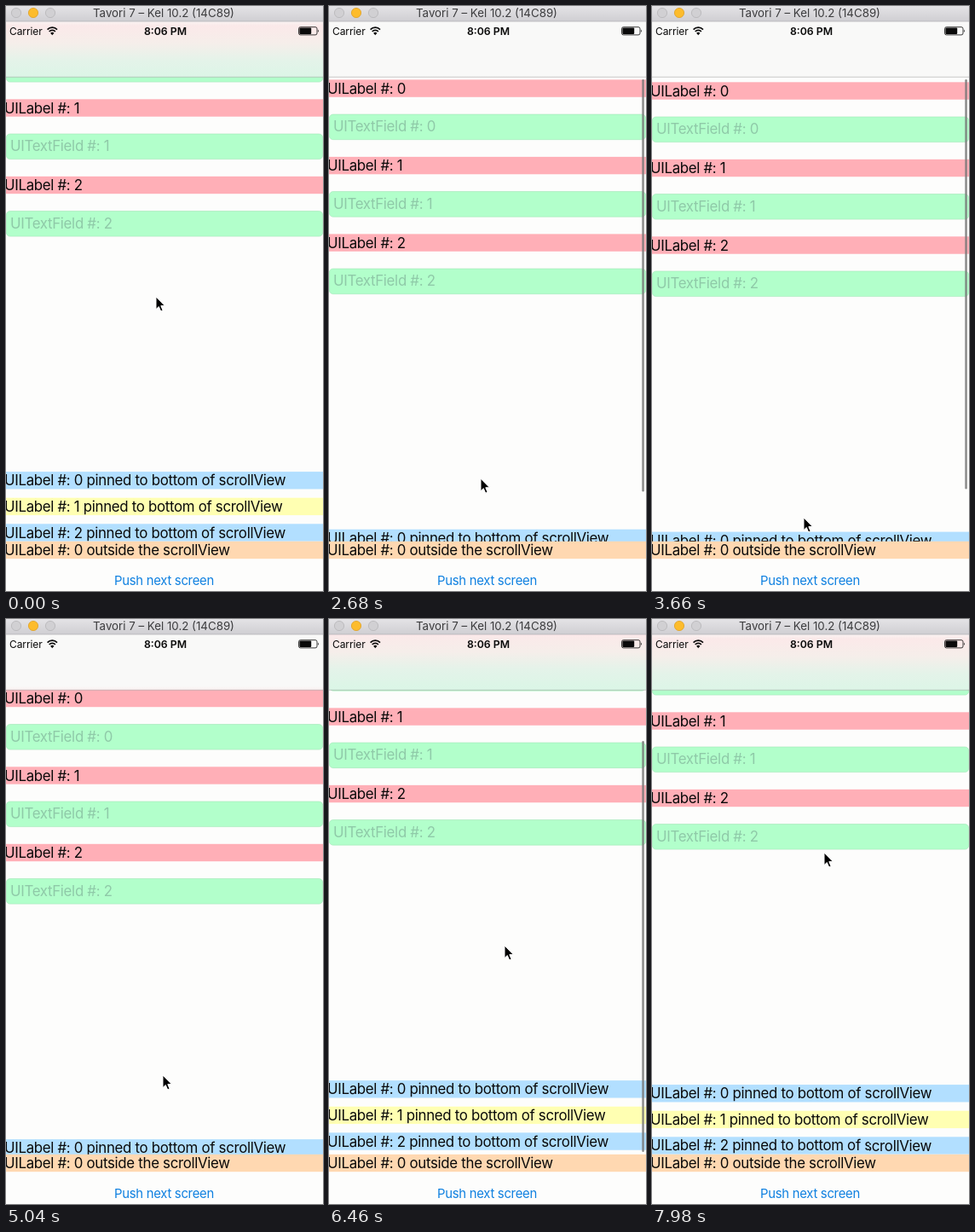
An HTML page that plays this animation: 372 px wide and 686 px high, repeating every 8000 ms.

```html
<!DOCTYPE html>
<html lang="en">
<head>
<meta charset="utf-8">
<title>Scroll view demo</title>
<style>
  html, body { margin: 0; width: 100%; height: 100%; overflow: hidden; background: #fdfdfc; }
  svg { display: block; width: 372px; height: 686px; }
  text { font-family: Inter, Roboto, sans-serif; white-space: pre; }
  .row { font-size: 16.86px; letter-spacing: -.32px; fill: #0a0a0a; }
  .hint { fill: #8fc9a8; }
</style>
</head>
<body>
<svg viewBox="0 0 372 686">
  <defs>
    <linearGradient id="chrome" x2="0" y2="1">
      <stop stop-color="#e4e3e6"/><stop offset="1" stop-color="#cfced2"/>
    </linearGradient>
    <linearGradient id="tint" x2="0" y2="1">
      <stop stop-color="#fbe8e8" stop-opacity="0"/><stop offset=".1" stop-color="#fbe9e9"/>
      <stop offset=".33" stop-color="#f5eeea"/><stop offset=".55" stop-color="#e4f3e9"/>
      <stop offset=".82" stop-color="#daf6e6"/><stop offset="1" stop-color="#daf6e6" stop-opacity="0"/>
    </linearGradient>
    <clipPath id="view"><rect y="18" width="372" height="610"/></clipPath>
    <clipPath id="nav"><rect y="18" width="372" height="65"/></clipPath>
  </defs>
  <rect width="372" height="686" fill="#fdfdfc"/>
  <g clip-path="url(#view)"><g id="content"></g></g>
  <rect id="bar" x="367.3" width="2.5" rx="1.25" fill="#777"/>
  <g id="footer"></g>
  <text x="185.5" y="679" font-size="14.9" letter-spacing="-.3" text-anchor="middle" fill="#0f80e0">Push next screen</text>

  <rect y="18" width="372" height="65" fill="#f9f9f8"/>
  <g clip-path="url(#nav)"><rect id="glow" width="372" height="90" fill="url(#tint)"/></g>
  <path d="M0 83.3H372" stroke="#b2b2b2" stroke-width=".7"/>

  <rect width="372" height="18" fill="url(#chrome)"/>
  <path d="M0 18H372" stroke="#b4b3b6" stroke-width=".8"/>
  <g stroke-width=".8">
    <circle cx="12" cy="8" r="5.6" fill="#d1d0d3" stroke="#b6b5b8"/>
    <circle cx="32" cy="8" r="5.6" fill="#fdbc2c" stroke="#dfa023"/>
    <circle cx="52" cy="8" r="5.6" fill="#d1d0d3" stroke="#b6b5b8"/>
  </g>
  <text x="185" y="13" font-size="13.3" text-anchor="middle" fill="#3c3c3e">Tavori 7 – Kel 10.2 (14C89)</text>

  <g fill="#0a0a0a">
    <text x="4" y="33.5" font-size="12" letter-spacing="-.1">Carrier</text>
    <text x="187" y="33.5" font-size="12.3" font-weight="600" text-anchor="middle">8:06 PM</text>
    <g fill="none" stroke="#0a0a0a" stroke-width="1.7">
      <path d="M48.6 27.6a8 8 0 0 1 11.4 0M50.7 30a5 5 0 0 1 7.2 0"/>
    </g>
    <path d="M54.3 34.2l-2.2-2.4a3.1 3.1 0 0 1 4.4 0z"/>
    <rect x="343.5" y="24.7" width="21.5" height="9.2" rx="2" fill="none" stroke="#0a0a0a" stroke-width=".8"/>
    <rect x="344.4" y="25.6" width="13.8" height="7.4" rx="1"/>
    <path d="M366 27.6q1.8 1.7 0 3.4z"/>
  </g>
  <path id="cursor" d="M0 0V14.6L3.3 11.5 5.7 17 8.1 16 5.8 10.6H10.4Z" fill="#000" stroke="#fff" stroke-width="1"/>
</svg>
<script>
const $ = id => document.getElementById(id);
const LOOP = 8000, TOP = 183.5, RANGE = 64, VIEW = 545;

// Rows are placed by their centre, relative to the second label.
const label = (y, fill, text) =>
  `<rect y="${y - 10.2}" width="372" height="20.4" fill="${fill}"/>` +
  `<text class="row" x="-2" y="${y + 6}">${text}</text>`;
const field = (y, i) =>
  `<rect x=".3" y="${y - 14.8}" width="371.4" height="29.6" rx="4.5" fill="#b2ffcb" stroke="#a2e6b8" stroke-width=".6"/>` +
  `<text class="row hint" x="5" y="${y + 5.5}">UITextField #: ${i}</text>`;

let rows = '';
for (let i = 0; i < 3; i++) {
  const y = (i - 1) * 90.5;
  rows += label(y, '#ffafb7', `UILabel #: ${i}`) + field(y + 45.3, i);
}
['#b2dfff', '#ffffb2', '#b2dfff'].forEach((fill, i) => {
  rows += label(436.8 + i * 30.6, fill, `UILabel #: ${i} pinned to bottom of scrollView`);
});
$('content').innerHTML = rows;
$('footer').innerHTML = label(638, '#ffd8b1', 'UILabel #: 0 outside the scrollView');

// Pointer path: time, x, y
const path = [
  [0, 176, 341], [1420, 174, 490], [2430, 174, 483.6], [2680, 178, 554],
  [3080, 178, 600], [3660, 178, 600], [4850, 184, 535], [5150, 184, 535],
  [5900, 205, 383], [6460, 206, 383], [7980, 202, 274]
];
const secant = (i, k) => path[i] && path[i + 1]
  ? (path[i + 1][k] - path[i][k]) / (path[i + 1][0] - path[i][0]) : 0;
const slope = (i, k) => {
  const a = secant(i - 1, k), b = secant(i, k);
  return a * b > 0 ? 2 * a * b / (a + b) : 0;
};
function pointer(t, k) {
  let i = 0;
  while (i < path.length - 2 && t >= path[i + 1][0]) i++;
  const p = path[i], q = path[i + 1], h = q[0] - p[0];
  const u = Math.min(1, (t - p[0]) / h), v = 1 - u;
  return p[k] * (1 + 2 * u) * v * v + q[k] * u * u * (3 - 2 * u)
    + h * u * v * (slope(i, k) * v - slope(i + 1, k) * u);
}

const rubber = d => VIEW * (1 - 1 / (d * .55 / VIEW + 1));
const settle = ms => { const w = Math.max(0, ms) * .011; return (1 + w) * Math.exp(-w); };
const ramp = (t, a, b) => Math.min(1, Math.max(0, (t - a) / (b - a)));

// Drag follows the pointer, stretches past the end, springs back on release.
function pull(t, start, release) {
  const d = Math.abs(pointer(Math.min(t, release), 2) - pointer(start, 2));
  return d <= RANGE ? d : RANGE + rubber(d - RANGE) * settle(t - release);
}
function scrollY(t) {
  if (t < 2430) return TOP - RANGE;
  if (t < 5150) return TOP - RANGE + pull(t, 2430, 3410);
  return TOP - pull(t, 5150, 6120);
}

function draw(t) {
  const y = scrollY(t), off = TOP - y;
  $('content').setAttribute('transform', `translate(0 ${y})`);
  $('glow').setAttribute('y', y - 105);

  const inside = Math.min(RANGE, Math.max(0, off));
  const start = 86 + inside / RANGE * 52;
  $('bar').setAttribute('y', start + Math.max(0, off - RANGE));
  $('bar').setAttribute('height', 487 - Math.abs(off - inside));
  $('bar').setAttribute('opacity', .85 * (ramp(t, 2430, 2500) - ramp(t, 4700, 5030)
    + ramp(t, 5150, 5220) - ramp(t, 7350, 7650)));

  $('cursor').setAttribute('transform', `translate(${pointer(t, 1)} ${pointer(t, 2)})`);
}

const begin = performance.now();
function tick() {
  draw((performance.now() - begin) % LOOP);
  requestAnimationFrame(tick);
}
tick();
</script>
</body>
</html>
```
